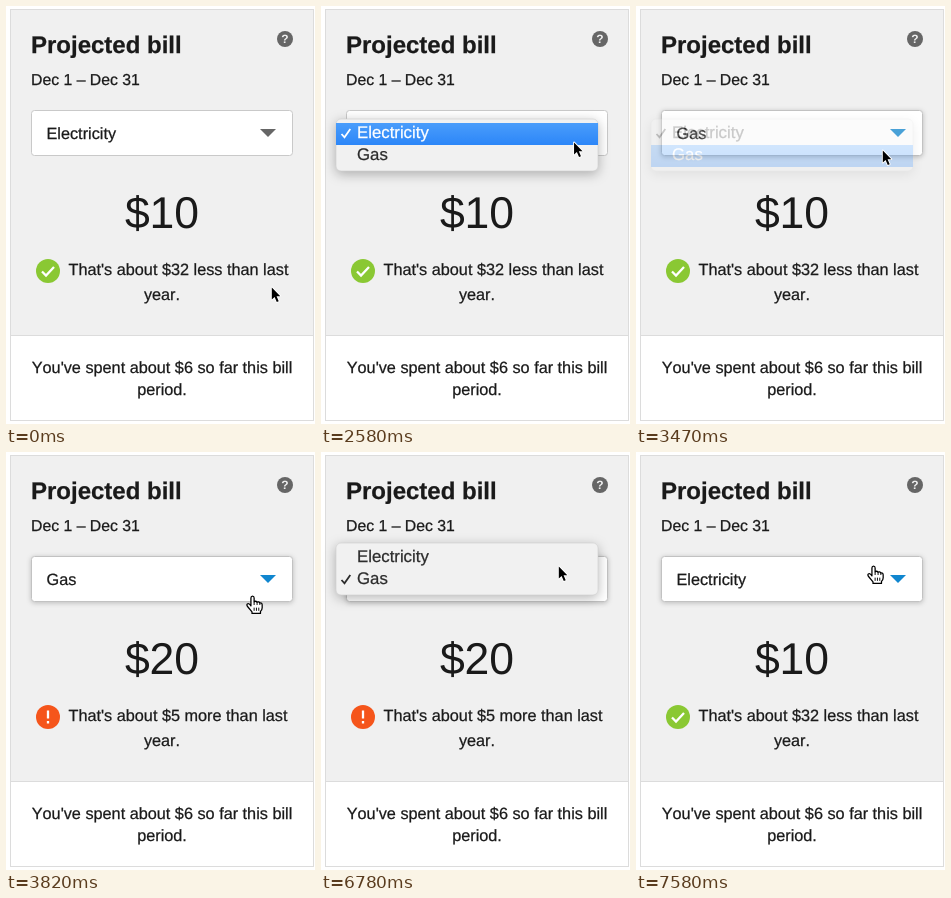
Write an HTML page that moves like this. It is 309x418 px and loops after 8 s.

```html
<!DOCTYPE html>
<html lang="en">
<head>
<meta charset="utf-8">
<title>Projected bill</title>
<style>
  html, body { margin: 0; width: 100%; height: 100%; overflow: hidden; background: #fff; }
  svg { display: block; width: 309px; height: 418px; }
  text {
    font: 16.25px "Liberation Sans", Arial, sans-serif; font-kerning: none;
    fill: #1a1a1a; stroke: #1a1a1a; stroke-width: .25; text-rendering: geometricPrecision;
  }
  .title { font-size: 24px; font-weight: bold; }
  .date { font-size: 15.8px; }
  .price { font-size: 44.5px; stroke: none; }
  .mid { text-anchor: middle; }
  .help { font-size: 12px; font-weight: bold; fill: #f0f0f0; stroke: none; }
  #box { fill: #fff; stroke: #c9c9c9; }
  #box.active { stroke: #c2c2c2; filter: drop-shadow(0 1px 2.5px rgba(0, 0, 0, .22)); }
  #sheet { fill: #f1f1f1; stroke: #cfcfcf; stroke-width: .6; filter: drop-shadow(0 3px 6px rgba(0, 0, 0, .28)); }
  #menu text { font-size: 16.8px; fill: #2c2c2c; stroke: #2c2c2c; }
  #menu text.on { fill: #fff; stroke: #fff; }
  #tick { fill: none; stroke-width: 1.8; }
</style>
</head>
<body>
<svg viewBox="0 0 309 418">
  <defs>
    <linearGradient id="blue" x2="0" y2="1">
      <stop stop-color="#4a9dfb"/><stop offset="1" stop-color="#2c86f8"/>
    </linearGradient>
  </defs>

  <rect x="4.5" y="3.5" width="303" height="411" fill="#fff" stroke="#dcdcdc"/>
  <path d="M5 4H307V329H5Z" fill="#f0f0f0"/>
  <path d="M5 329.5H307" stroke="#dcdcdc"/>
  <text class="title" x="25" y="47">Projected bill</text>
  <text class="date" x="25" y="79">Dec 1 – Dec 31</text>
  <circle cx="279" cy="33" r="8" fill="#666"/>
  <text class="help mid" x="279" y="37.3">?</text>

  <rect id="box" x="25.5" y="104.5" width="261" height="45" rx="3"/>
  <text id="label" x="40.5" y="133"></text>
  <path id="caret" d="M254 123H270L262 131Z"/>

  <g id="content">
    <text class="price mid" id="price" x="156" y="222.3"></text>
    <circle id="badge" cx="42" cy="265" r="12"/>
    <path id="mark" fill="none" stroke="#fff" stroke-width="2.3"/>
    <text id="note" x="62.5" y="269"></text>
    <text class="mid" x="156" y="294">year.</text>
    <text class="mid" x="156" y="367">You've spent about $6 so far this bill</text>
    <text class="mid" x="156" y="389">period.</text>
  </g>

  <g id="menu">
    <rect id="sheet" x="15" y="113" width="262" height="52" rx="5"/>
    <rect id="highlight" x="15" width="262" height="22" fill="url(#blue)"/>
    <path id="tick" d="M20.5 128L23.5 131.3L29.3 123"/>
    <text id="row0" x="36" y="132">Electricity</text>
    <text id="row1" x="36" y="154">Gas</text>
  </g>

  <g id="cursor" stroke-linejoin="round">
    <path id="arrow" d="M.8 1.5V13.6L3.6 11L5.8 16L7.7 15.2L5.6 10.2H9.3Z"
      fill="#000" stroke="#fff" stroke-width="1.8" paint-order="stroke"/>
    <g id="hand" transform="translate(0 -.6) scale(1.06)" fill="#fff" stroke="#000" stroke-width="1.2">
      <path d="M-1 10V3.4Q-1 1.6 .5 1.6T2 3.4V7Q3.5 5.8 4.8 7.4Q6.4 6.4 7.4 8.2Q9.6 7.6 9.6 10V12.5Q9.6 14.5 8 16V18H0V16.5L-4.4 11.2Q-5.4 9.4 -4 8.8T-1 10.8Z"/>
      <path d="M2 7V10M4.8 7.6V10M7.4 8.4V10M2 12.5V15.5M4.2 12.5V15.5M6.4 12.5V15.5" fill="none" stroke-width=".9"/>
    </g>
  </g>
</svg>
<script>
const LOOP = 8000;
const $ = id => document.getElementById(id);
const set = (id, attrs) => { for (const key in attrs) $(id).setAttribute(key, attrs[key]); };
const show = (id, visible) => set(id, { visibility: visible ? 'visible' : 'hidden' });

const bills = [
  { label: 'Electricity', price: '$10', note: "That's about $32 less than last",
    color: '#8ac833', mark: 'M36 265.5L40 269.5L48 261' },
  { label: 'Gas', price: '$20', note: "That's about $5 more than last",
    color: '#f5551b', mark: 'M42 258.5V266.5M42 269V271.4' },
];

// Each visit to the menu: opened, pick blinks off, back on, sheet fades, new bill fades in.
const visits = [
  { open: 1510, off: 3020, on: 3200, fade: 3290, gone: 3560, swap: 3560, done: 3820, from: 0 },
  { open: 5620, off: 6690, on: 6870, fade: 6960, gone: 7230, swap: 7320, done: 7580, from: 1 },
];

const moves = [
  { start: 540, end: 1060, steps: 7, a: [265, 280], c: [285, 200], b: [257, 125] },
  { start: 2400, end: 2840, steps: 6, a: [257, 125], c: [253, 136], b: [246, 143] },
  { start: 6070, end: 6510, steps: 6, a: [246, 143], c: [243, 126], b: [237, 113] },
];

// Progress 0..1 in equal jumps, the first at start and the last at end.
function stepped(t, start, end, n) {
  const i = Math.floor((t - start) / (end - start) * (n - 1) + 1e-6) + 1;
  return Math.max(0, Math.min(n, i)) / n;
}

function pointer(t) {
  const m = moves.filter(m => t >= m.start).pop() || moves[0];
  const p = stepped(t, m.start, m.end, m.steps);
  const e = p * p * (3 - 2 * p), r = 1 - e;
  return m.a.map((a, i) => r * r * a + 2 * r * e * m.c[i] + e * e * m.b[i]);
}

function draw(t) {
  const [x, y] = pointer(t);
  const visit = visits.find(v => t >= v.open && t < v.gone);
  const hover = y < 150;
  const chosen = t >= visits[0].fade && t < visits[1].fade ? 1 : 0;
  const bill = bills[t >= visits[0].swap && t < visits[1].swap ? 1 : 0];
  const fading = visits.find(v => t >= v.swap && t < v.done);

  $('label').textContent = bills[chosen].label;
  $('box').classList.toggle('active', t >= visits[0].fade);
  set('caret', { fill: hover ? '#1086cf' : '#666' });

  $('price').textContent = bill.price;
  $('note').textContent = bill.note;
  set('badge', { fill: bill.color });
  set('mark', { d: bill.mark });
  set('content', { opacity: fading ? stepped(t, fading.swap, fading.done, 4) : 1 });

  show('menu', visit);
  if (visit) {
    const shift = -22 * visit.from;
    const row = y - shift >= 139 ? 1 : 0;
    const lit = t < visit.off || t >= visit.on;
    set('menu', {
      transform: `translate(0 ${shift})`,
      opacity: 1 - stepped(t, visit.fade, visit.gone, 4),
    });
    set('highlight', { y: 117 + 22 * row, opacity: +lit });
    set('tick', {
      transform: `translate(0 ${22 * visit.from})`,
      stroke: lit && row === visit.from ? '#fff' : '#2c2c2c',
    });
    [0, 1].forEach(i => $('row' + i).classList.toggle('on', lit && row === i));
  }

  const hand = hover && !visit;
  set('cursor', { transform: `translate(${x} ${y})` });
  show('hand', hand);
  show('arrow', !hand);
}

function tick() {
  draw(performance.now() % LOOP);
  requestAnimationFrame(tick);
}
tick();
</script>
</body>
</html>
```
